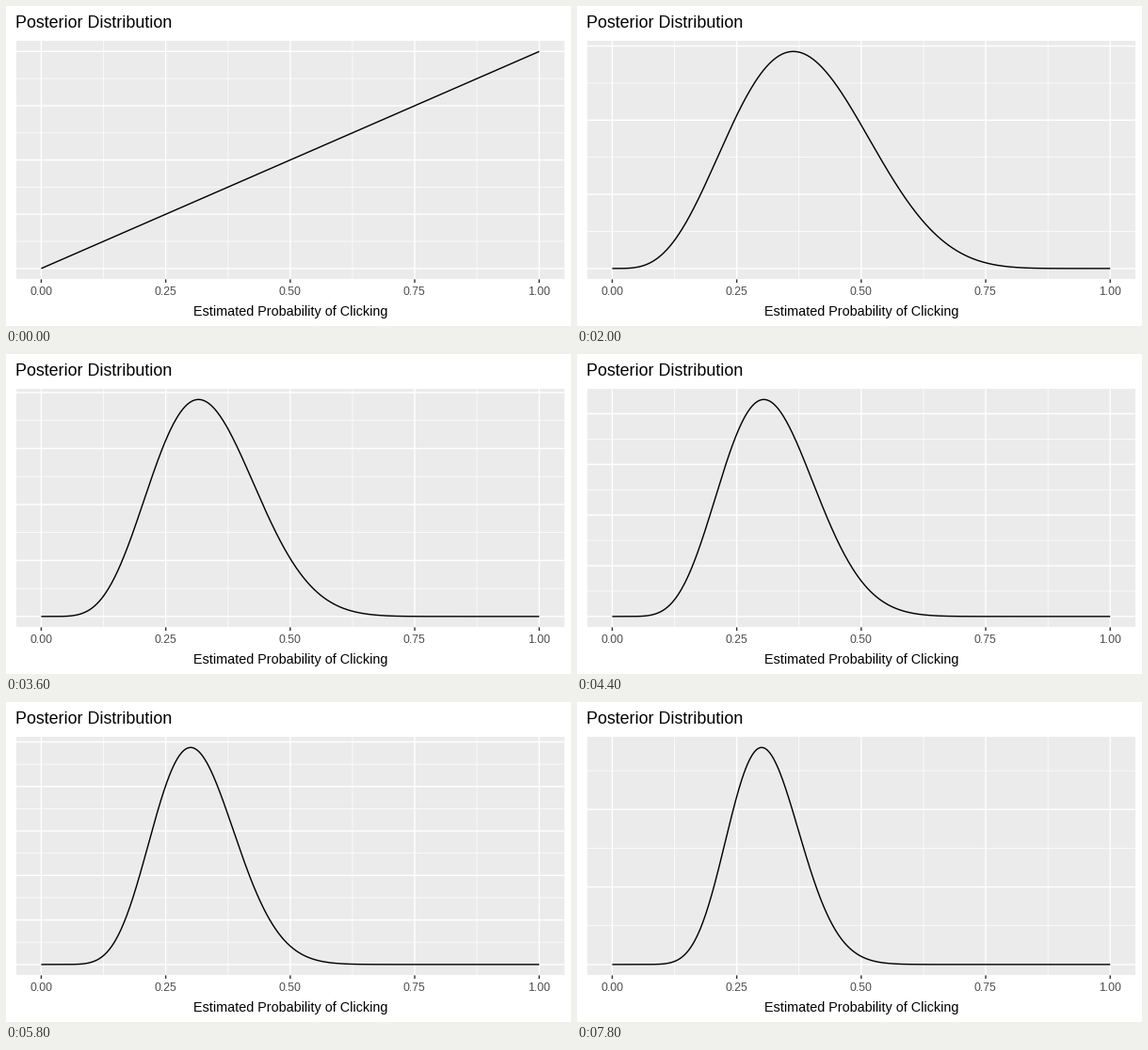
A matplotlib script that plays this animation: 600 by 340 pixels, repeating every 8000 ms.

```python
import math

import matplotlib.pyplot as plt
import numpy as np
from matplotlib.animation import FuncAnimation
from matplotlib.collections import LineCollection
from matplotlib.patches import Rectangle

W, H, DPI = 600, 340, 100
PX = 72 / DPI                       # points per pixel
FRAMES, INTERVAL = 40, 200

LEFT, RIGHT = 11.0, 592.67
TOP, BOTTOM = 36.8, 290.4
PAD = 0.05                          # axis expansion on each side

# trials that ended in a click
CLICKS = {1, 3, 5, 9, 14, 18, 22, 25, 29, 34, 37, 39}

P = np.linspace(0, 1, 501)


def to_x(p):
    return LEFT + (RIGHT - LEFT) * (p + PAD) / (1 + 2 * PAD)


def to_y(v):
    """Map a share of the peak height to a pixel row."""
    return BOTTOM - (BOTTOM - TOP) * (v + PAD) / (1 + 2 * PAD)


def posterior(n):
    """Beta density after n trials, starting from a uniform prior."""
    s = sum(c <= n for c in CLICKS)
    scale = (n + 1) * math.comb(n, s)

    def pdf(p):
        return scale * p ** s * (1 - p) ** (n - s)

    return pdf(P), pdf(s / n)


def tick_step(peak, want=5):
    """Pick a break step by simplicity, coverage and density."""
    lo, hi = -PAD * peak, (1 + PAD) * peak
    span = hi - lo
    best, choice = -math.inf, 1
    for i, q in enumerate((1, 5, 2, 2.5, 4, 3)):
        for power in (-1, 0, 1):
            step = q * 10 ** power
            for k in range(2, 13):
                end = step * (k - 1)
                cover = 1 - 0.5 * ((hi - end) ** 2 + lo ** 2) / (0.1 * span) ** 2
                ratio = (max(end, hi) - lo) / step / (want - 1)
                density = 2 - max(ratio, 1 / ratio)
                score = 0.25 * (1 - i / 5) + 0.2 * cover + 0.5 * density
                if score > best:
                    best, choice = score, step
    return choice


def rows(values):
    return [[(LEFT, to_y(v)), (RIGHT, to_y(v))]
            for v in values if -PAD <= v <= 1 + PAD]


def cols(values):
    return [[(to_x(v), TOP), (to_x(v), BOTTOM)] for v in values]


fig = plt.figure(figsize=(W / DPI, H / DPI), dpi=DPI, facecolor="white")
ax = fig.add_axes([0, 0, 1, 1])
ax.set_xlim(0, W)
ax.set_ylim(H, 0)
ax.axis("off")

ax.add_patch(Rectangle((11, 37), 582, 253, fc="#EBEBEB", lw=0,
                       antialiased=False, zorder=0))


def add_lines(segments, width, color, z):
    lines = LineCollection(segments, linewidths=width * PX, colors=color,
                           capstyle="butt", zorder=z)
    lines.set_snap(False)
    ax.add_collection(lines, autolim=False)
    return lines


def add_text(x, y, s, size, color="black", ha="center"):
    ax.text(x, y, s, fontsize=size * PX, color=color, ha=ha, va="baseline",
            family="Liberation Sans")


THICK, THIN = 1.42, 0.71
BREAKS = np.arange(5) / 4

minor = add_lines([], THIN, "white", 1)
add_lines(cols(BREAKS[:-1] + 0.125), THIN, "white", 1)
major = add_lines([], THICK, "white", 2)
add_lines(cols(BREAKS), THICK, "white", 2)
add_lines([[(to_x(b), BOTTOM), (to_x(b), BOTTOM + 3.67)] for b in BREAKS],
          THICK, "#333333", 2)

curve, = ax.plot([], [], color="black", lw=THICK * PX, zorder=3,
                 solid_capstyle="butt", solid_joinstyle="round")
curve.set_snap(False)

add_text(10.4, 23, "Posterior Distribution", 17.9, ha="left")
add_text(301.8, 329, "Estimated Probability of Clicking", 14.45)
for b in BREAKS:
    add_text(to_x(b) - 0.3, 307, f"{b:.2f}", 12.2, "#4D4D4D")


def update(frame):
    density, peak = posterior(frame + 1)
    curve.set_data(to_x(P), to_y(density / peak))
    step = tick_step(peak) / peak
    marks = np.arange(16) * step
    major.set_segments(rows(marks))
    minor.set_segments(rows(marks + step / 2))
    return curve, major, minor


anim = FuncAnimation(fig, update, frames=FRAMES, interval=INTERVAL,
                     init_func=lambda: update(0), repeat=True,
                     repeat_delay=0, blit=False)
plt.show()
```
